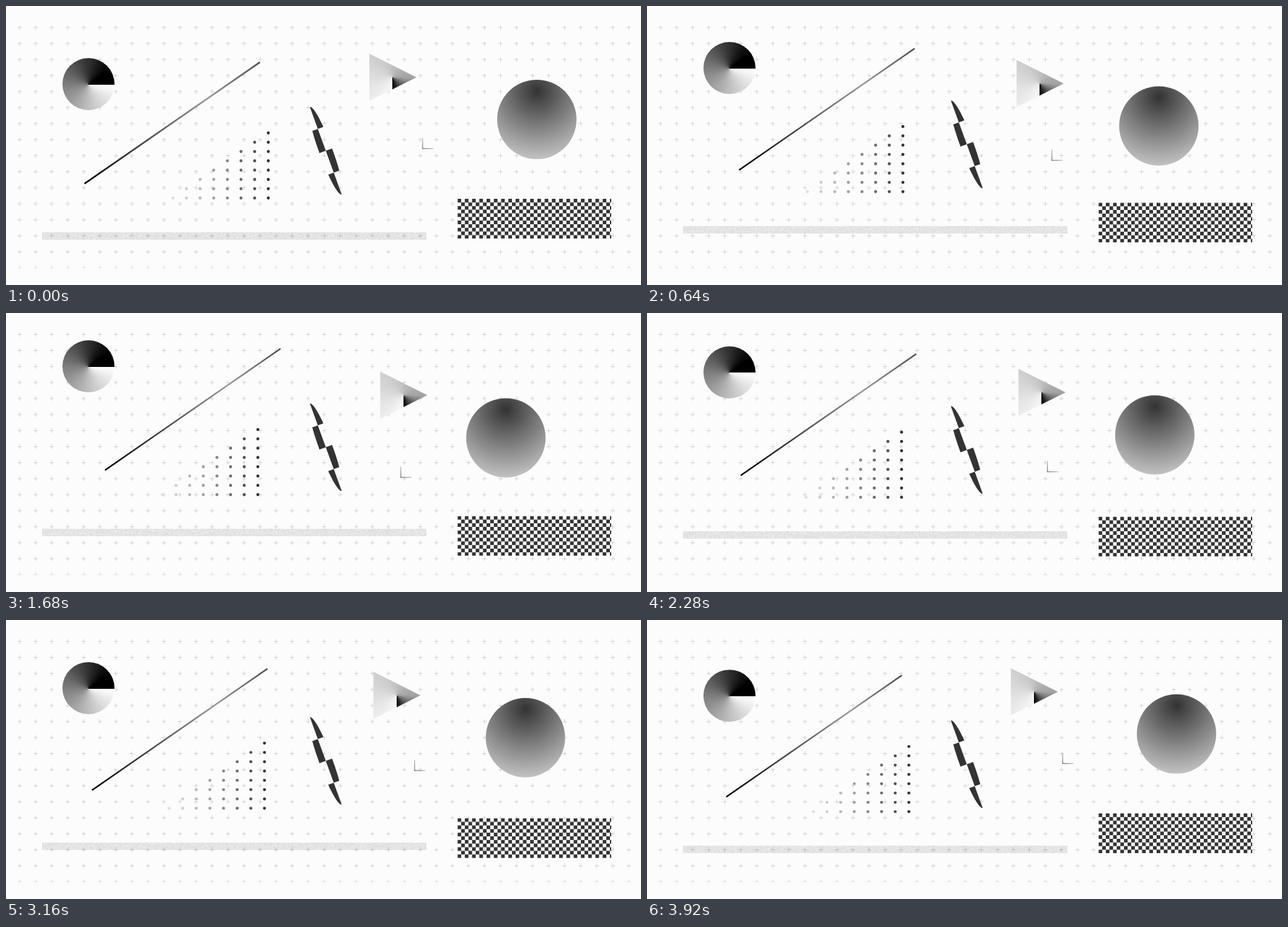
An HTML page with a canvas that plays this animation: 1024 by 450 pixels, repeating every 3960 ms.

```html
<!DOCTYPE html>
<html lang="en">
<head>
<meta charset="utf-8">
<title>Floating shapes</title>
<style>
html, body { margin: 0; width: 100%; height: 100%; overflow: hidden; background: #fcfcfc; }
canvas { display: block; }
</style>
</head>
<body>
<canvas id="stage" width="1024" height="450"></canvas>
<script>
const LOOP = 3960, STEP = 40, PAPER = '#fcfcfc', DARK = '#333';
const ctx = document.getElementById('stage').getContext('2d');

// Linear move out to `reach` at `peak` seconds, then linear return.
const drift = (t, reach, peak, end = 4.02) => reach * Math.min(t / peak, (end - t) / (end - peak));

const grey = v => `rgb(${v},${v},${v})`;

function at(x, y, draw) {
  ctx.save();
  ctx.translate(x, y);
  draw();
  ctx.restore();
}

function shade(gradient, from, mid, pos, to, last = 1) {
  gradient.addColorStop(0, grey(from));
  gradient.addColorStop(pos, grey(mid));
  gradient.addColorStop(last, grey(to));
  return gradient;
}

function disc(x, y, r) {
  ctx.beginPath();
  ctx.arc(x, y, r, 0, 7);
  ctx.fill();
}

function stroke(x1, y1, x2, y2, width, style) {
  ctx.strokeStyle = style;
  ctx.lineWidth = width;
  ctx.beginPath();
  ctx.moveTo(x1, y1);
  ctx.lineTo(x2, y2);
  ctx.stroke();
}

const pieFill = shade(ctx.createConicGradient(0, 0, .7), 255, 126, .5, 0, .9);
const arrowFill = shade(ctx.createConicGradient(Math.PI / 2, -.6, 0), 250, 164, .75, 0);
const ballFill = shade(ctx.createRadialGradient(0, -46, 0, 0, -46, 118), 51, 128, .5, 204);
const lineFill = shade(ctx.createLinearGradient(0, 0, 283, -196), 0, 152, .7, 75);
const markFill = shade(ctx.createRadialGradient(0, 0, 0, 0, 0, 18), 100, 145, .5, 190);

function makeNoise(w, h) {
  const c = document.createElement('canvas');
  c.width = w;
  c.height = h;
  const g = c.getContext('2d');
  let seed = 7;
  for (let i = 0; i < w * h; i++) {
    seed = (seed * 16807) % 2147483647;
    g.fillStyle = `rgba(0,0,0,${.05 + .09 * seed / 2147483647})`;
    g.fillRect(i % w, Math.floor(i / w), 1, 1);
  }
  return c;
}
const noise = makeNoise(620, 12);

function grid() {
  const gap = 25.85, arm = 3.6;
  ctx.save();
  ctx.beginPath();
  ctx.rect(0, 0, 1024, 422.5);
  ctx.clip();
  for (let y = 34.6; y < 430; y += gap) {
    for (let x = 22; x < 1010; x += gap) {
      stroke(x - arm, y, x + arm, y, .8, '#c8c8c8');
      stroke(x, y - arm, x, y + arm, .8, '#c8c8c8');
    }
  }
  ctx.restore();
}

function pie() {
  ctx.fillStyle = pieFill;
  disc(0, 0, 42);
}

function arrow() {
  ctx.fillStyle = arrowFill;
  ctx.beginPath();
  ctx.moveTo(-38, -38);
  ctx.lineTo(38, 0);
  ctx.lineTo(-38, 38);
  ctx.fill();
}

function ball() {
  ctx.fillStyle = ballFill;
  disc(0, 0, 64);
}

function dots() {
  for (let col = 0; col < 8; col++) {
    ctx.fillStyle = grey(Math.round(222 - 170 * (col / 7) ** 1.2));
    for (let row = 0; row <= col; row++) disc(col * 22, -row * 15, 2.45);
  }
}

function checks(cols, rows, w, h, first) {
  ctx.clip();
  ctx.fillStyle = DARK;
  for (let row = 0; row < rows; row++) {
    for (let col = (row + first) % 2; col < cols; col += 2) ctx.fillRect(col * w, row * h, w, h);
  }
}

function leaf() {
  ctx.rotate(-Math.PI / 9);
  ctx.translate(-11, -75);
  ctx.beginPath();
  ctx.ellipse(11, 75, 11, 75, 0, 0, 7);
  checks(2, 4, 11, 37.5, 1);
}

function checker() {
  ctx.beginPath();
  ctx.rect(0, 0, 247.8, 64);
  checks(43, 11, 5.85, 5.85, 0);
}

function mark() {
  stroke(0, .6, 0, -17.5, 1.2, markFill);
  stroke(0, 0, 17.5, 0, 1.2, markFill);
}

function render(t) {
  ctx.fillStyle = PAPER;
  ctx.fillRect(0, 0, 1024, 450);
  grid();

  const slow = drift(t, 20, 1.24);
  const line = drift(t, 40.4, 1.17);
  const tri = drift(t, 20.3, 1.3);
  const corner = drift(t, 40, 1.35);

  at(133, 126 - drift(t, 48, 1.18, 4.16), pie);
  at(126.5 + line, 286.6 - line, () => stroke(0, 0, 283, -196, 2.5, lineFill));
  at(269 - slow, 309.8 - slow, dots);
  at(515.7, 233.4 - slow, leaf);
  at(624 + tri, 115 + tri, arrow);
  at(671.8 - corner, 230 + corner, mark);
  at(856 - drift(t, 59.3, 1.24), 183 + drift(t, 21.3, 1.31), ball);
  at(728.2, 311 + drift(t, 20, 2.04), checker);
  at(58, 365 - slow, () => ctx.drawImage(noise, 0, 0));
}

function tick(now) {
  render(Math.floor(now % LOOP / STEP) * STEP / 1000);
  requestAnimationFrame(tick);
}
render(0);
requestAnimationFrame(tick);
</script>
</body>
</html>
```
